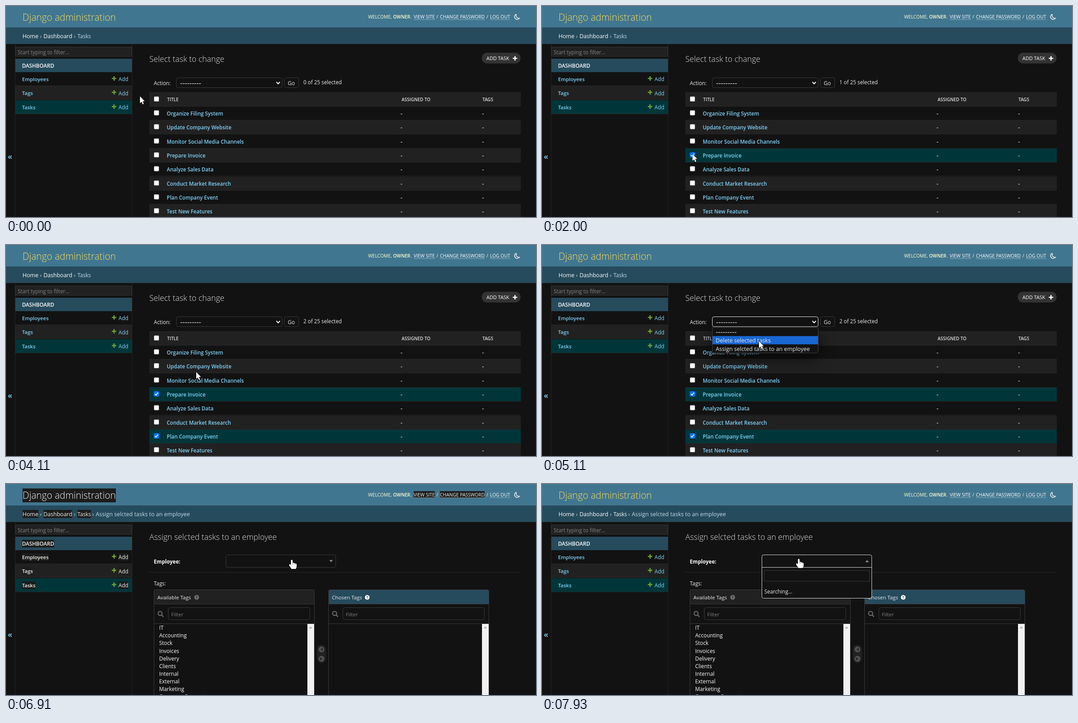
An HTML page with a canvas that plays this animation: 1187x472 px, repeating every 8000 ms.

```html
<!DOCTYPE html>
<html lang="en">
<head>
<meta charset="utf-8">
<title>Task list</title>
<style>
html, body { margin: 0; height: 100%; overflow: hidden; background: #121212; }
canvas { display: block; }
</style>
</head>
<body>
<canvas id="stage" width="1187" height="472"></canvas>
<script>
const c = document.getElementById('stage').getContext('2d');
const LOOP = 8000;
const BG = '#121212', DARK = '#212121', LINE = '#272727', EDGE = '#3a3a3a';
const BLUE = '#264b5d', LINK = '#81d4fa', TEXT = '#eeeeee', PICKED = '#00363a';
const TASKS = ['Organize Filing System', 'Update Company Website', 'Monitor Social Media Channels',
  'Prepare Invoice', 'Analyze Sales Data', 'Conduct Market Research', 'Plan Company Event', 'Test New Features'];
const TAGS = ['IT', 'Accounting', 'Stock', 'Invoices', 'Delivery', 'Clients', 'Internal', 'External',
  'Marketing', 'Customer Support'];
const ASSIGN = 'Assign selcted tasks to an employee', DASHES = '---------';

// pointer tip: time, x, y
const PATH = [[0, 300, 202], [730, 300, 202], [1000, 318, 245], [1340, 336, 309], [1470, 336, 319],
  [1600, 337, 331], [2260, 337, 331], [3000, 339, 423], [3100, 339, 425], [3700, 339, 425],
  [4430, 494, 175], [4840, 494, 175], [5110, 486, 215], [5450, 506, 225], [5590, 506, 225],
  [6120, 639, 171], [6320, 640, 170], [7050, 640, 170], [7350, 620, 172], [7800, 579, 170], [7930, 575, 168]];

function pointerAt(t) {
  const i = PATH.findIndex(p => p[0] > t);
  if (i < 0) return PATH[PATH.length - 1].slice(1);
  const [t0, x0, y0] = PATH[i - 1], [t1, x1, y1] = PATH[i], k = (t - t0) / (t1 - t0);
  return [x0 + (x1 - x0) * k, y0 + (y1 - y0) * k];
}

function rect(x, y, w, h, fill) {
  c.fillStyle = fill;
  c.fillRect(x, y, w, h);
}

function frame(x, y, w, h, r, fill, edge) {
  c.beginPath();
  c.roundRect(x + .5, y + .5, w - 1, h - 1, r);
  c.fillStyle = fill;
  c.fill();
  if (edge) stroke(edge, 1);
}

function stroke(color, width) {
  c.strokeStyle = color;
  c.lineWidth = width;
  c.stroke();
}

function lines(color, width, ...runs) {
  c.beginPath();
  for (const run of runs)
    for (let i = 0; i < run.length; i += 2) c[i ? 'lineTo' : 'moveTo'](run[i], run[i + 1]);
  stroke(color, width);
}

function disc(x, y, r, fill) {
  c.beginPath();
  c.arc(x, y, r, 0, 7);
  c.fillStyle = fill;
  c.fill();
}

// y is the middle of the capitals
function text(s, x, y, size = 11.8, color = TEXT, weight = 400) {
  c.font = `${weight} ${size}px "Open Sans", "Noto Sans", sans-serif`;
  c.fillStyle = color;
  c.fillText(s, x, Math.ceil(y + size * .36));
}

function link(s, x, y, size, color, weight, boxed) {
  if (boxed) {
    c.font = `${weight} ${size}px "Open Sans", "Noto Sans", sans-serif`;
    const h = size * 1.45;
    rect(x, Math.round(y - h / 2), c.measureText(s).width, Math.round(h), '#1c1c1c');
  }
  text(s, x, y, size, boxed ? '#f4f4ee' : color, weight);
}

function plus(x, y, r, color) {
  lines(color, 2.6, [x - r, y, x + r, y], [x, y - r, x, y + r]);
}

function chrome(page2, boxed) {
  rect(0, 0, 1187, 472, BG);
  rect(0, 0, 1187, 48, '#417690');
  rect(0, 48, 1187, 37, BLUE);
  link('Django administration', 37, 25, 21.1, '#f5dd5d', 300, boxed);

  text('WELCOME,', 811, 24, 10.4, '#ffffcc');
  text('OWNER', 867, 24, 10.4, '#ffffcc', 600);
  text('.', 906, 24, 10.4, '#ffffcc');
  [['VIEW SITE', 913, 48], ['CHANGE PASSWORD', 972, 101], ['LOG OUT', 1084, 45]].forEach(([s, x, w], i) => {
    link(s, x, 24, 10.4, '#ffffff', 400, boxed && i < 2);
    rect(x, 30, w, 1, 'rgba(255,255,255,.4)');
    if (i) text('/', x - 8, 24, 10.4, '#ffffcc');
  });
  c.beginPath();
  c.arc(1145, 24, 6, -1.9, 2.9 - 2.3, true);
  c.quadraticCurveTo(1141, 28, 1143, 18.3);
  stroke('#ffffff', 1.4);

  link('Home', 37, 67, 12.5, '#ffffff', 400, boxed);
  link('Dashboard', 84, 67, 12.5, '#ffffff', 400, boxed);
  link('Tasks', 160, 67, 12.1, page2 ? '#ffffff' : '#c4dce8', 400, boxed);
  text('›', 76, 67, 12.5, '#c4dce8');
  text('›', 152, 67, 12.5, '#c4dce8');
  if (page2) {
    text('›', 193, 67, 12.5, '#c4dce8');
    text(ASSIGN, 201, 67, 12.65, '#c4dce8');
  }

  rect(20, 85, 1, 387, LINE);
  rect(282, 85, 1, 387, LINE);
  text('«', 4, 336, 18, LINK, 600);
  frame(21, 91, 261, 22, 0, DARK, '#353535');
  text('Start typing to filter...', 26, 103, 11.85, '#858585');
  rect(21, 118, 261, 30, BLUE);
  link('DASHBOARD', 36, 133, 11.7, '#ffffff', 600, boxed);
  ['Employees', 'Tags', 'Tasks'].forEach((s, i) => {
    const y = 148 + 31.3 * i;
    rect(21, Math.round(y), 261, 31, [BG, DARK, PICKED][i]);
    rect(21, Math.round(y) + 30, 261, 1, LINE);
    link(s, 36, y + 15.5, 11.5, LINK, 600, boxed);
    link('Add', 252, y + 15.5, 11.8, LINK, 400, boxed);
    plus(242, Math.round(y) + 14, 5, '#70a630');
  });
}

function checkbox(y, on) {
  frame(331, y - 6, 12, 12, 2, on ? '#0075ff' : '#ffffff', on ? '#0075ff' : '#767676');
  if (on) lines('#ffffff', 1.9, [333.5, y + .3, 336, y + 2.8, 340.6, y - 3]);
}

function listPage(t) {
  const menu = t >= 4570 && t < 5590, assigned = t >= 5590;
  const count = (t >= 2000) + (t >= 3560);
  text('Select task to change', 321, 118, 17.8, '#e0e0e0', 300);
  frame(1065, 104, 88, 25, 12, '#333333');
  text('ADD TASK', 1076, 117, 11, '#ffffff');
  plus(1140, 117, 5, '#ffffff');

  text('Action:', 331, 172);
  frame(381, 160, 238, 23, 4, BG, t >= 4570 && t < 6320 ? '#eeeeee' : EDGE);
  text(assigned ? ASSIGN : DASHES, 390, 172, assigned ? 12.65 : 16.2);
  lines('#ffffff', 2, [605.5, 170, 609.5, 174, 613.5, 170]);
  frame(623, 160, 33, 23, 4, BG, t >= 6050 ? '#eeeeee' : EDGE);
  text('Go', 631, 172, 12);
  text(`${count} of 25 selected`, 666, 170);

  rect(321, 193, 832, 32, DARK);
  rect(321, 193, 832, 1, LINE);
  rect(321, 224, 832, 1, LINE);
  checkbox(208, false);
  text('TITLE', 361, 209, 10, '#e0e0e0', 600);
  text('ASSIGNED TO', 886, 209, 10, '#e0e0e0', 600);
  text('TAGS', 1067, 209, 10, '#e0e0e0', 600);
  TASKS.forEach((s, i) => {
    const y = Math.round(225 + 31.3 * i), mid = 240.3 + 31.35 * i;
    const lit = i == 3 && t >= 2000 || i == 6 && t >= 3560;
    rect(321, y, 832, 31, lit ? PICKED : i % 2 ? DARK : BG);
    rect(321, y + 30, 832, 1, LINE);
    checkbox(Math.round(239 + 31.35 * i), i == 3 && t >= 1800 || i == 6 && t >= 3430);
    text(s, 360, mid, 11.6, LINK, 600);
    text('-', 883.5, mid, 14);
    text('-', 1066, mid, 14);
  });

  if (menu) {
    const pick = t < 4980 ? 0 : t < 5250 ? 1 : 2;
    c.save();
    c.shadowColor = 'rgba(0,0,0,.6)';
    c.shadowBlur = 32;
    c.shadowOffsetY = 12;
    frame(381, 184, 238, 58, [0, 0, 5, 5], BG);
    c.restore();
    frame(381, 184, 238, 58, [0, 0, 5, 5], BG, '#444444');
    rect(382, 185 + 18.7 * pick, 236, 18.5, '#1967d2');
    text(DASHES, 389, 194, 16.2);
    text('Delete selected tasks', 389, 213, 12.6);
    text(ASSIGN, 389, 232, 12.65);
  }
}

function tagBox(x, title, head, chosen) {
  frame(x, 236, 360, 250, 4, BG, EDGE);
  frame(x, 236, 360, 33, [4, 4, 0, 0], head, EDGE);
  text(title, x + 8, 253, 11.6);
  const hx = x + (chosen ? 87 : 96);
  disc(hx, 253.5, 5.3, chosen ? '#ffffff' : '#707070');
  text('?', hx - 2.3, 253.5, 9, head, 700);
  c.beginPath();
  c.arc(x + 14, 289.5, 4.5, 0, 7);
  stroke('#707070', 2);
  lines('#707070', 2.4, [x + 17.5, 293, x + 21.5, 297]);
  frame(x + 32, 276, 318, 28, 4, BG, EDGE);
  text('Filter', x + 39, 291, 11.6, '#808080');
  rect(x, 312, 360, 1, EDGE);
  rect(x + 344, 313, 15, 159, '#f1f1f1');
  c.beginPath();
  c.moveTo(x + 348, 323);
  c.lineTo(x + 351.5, 319);
  c.lineTo(x + 355, 323);
  c.fillStyle = '#a3a3a3';
  c.fill();
}

function assignPage(t) {
  const open = t >= 7350;
  text(ASSIGN, 321, 118, 17.8, '#e0e0e0', 300);
  text('Employee:', 331, 173, 11.6, '#ffffff', 700);
  rect(321, 197, 832, 1, LINE);
  text('Tags:', 331, 222);
  tagBox(331, 'Available Tags', DARK, false);
  tagBox(722, 'Chosen Tags', BLUE, true);
  TAGS.forEach((s, i) => text(s, 343, 321.5 + 17.1 * i, 11.9, '#ffffff'));
  frame(696, 359, 21, 42, 10, DARK);
  [[370, 1], [391, -1]].forEach(([y, d]) => {
    disc(706.5, y, 6.5, '#555555');
    lines(DARK, 1.6, [706.5 - 4 * d, y, 706.5 + 3.5 * d, y],
      [706.5, y - 3.5, 706.5 + 3.5 * d, y, 706.5, y + 3.5]);
  });

  if (open) frame(492, 186, 247, 70, [0, 0, 4, 4], BG, '#dddddd');
  frame(492, 158, 247, 29, open ? [4, 4, 0, 0] : 4, BG, open ? '#dddddd' : EDGE);
  const d = open ? -2.5 : 2.5;
  c.beginPath();
  c.moveTo(724, 172.5 - d);
  c.lineTo(732, 172.5 - d);
  c.lineTo(728, 172.5 + d);
  c.fillStyle = '#888888';
  c.fill();
  if (open) {
    frame(497, 193, 237, 25, 0, BG, EDGE);
    text('Searching...', 498, 240, 11.7);
  }
}

function pointer(x, y, hand) {
  const shape = hand
    ? 'M-2 1.5Q-2-.5 0-.5T2 1.5V6Q4 5 5 7Q7 6 8 8Q11 7.5 11 10V14Q11 17 9 20H-1Q-2 17-5 13.5Q-7 10.5-5 9.5Q-3.5 9-2 11.5Z'
    : 'M0 0V15.5L3.6 12.2L6.2 18L8.6 17L6.1 11.3H10.8Z';
  const path = new Path2D(shape);
  c.save();
  c.translate(Math.round(x), Math.round(y));
  c.lineJoin = 'round';
  c.lineWidth = 1.4;
  c.strokeStyle = '#000000';
  c.stroke(path);
  c.fillStyle = '#ffffff';
  c.fill(path);
  if (hand) lines('#555555', .7, [2, 6, 2, 10], [5, 7, 5, 10], [8, 8, 8, 11]);
  c.restore();
}

function draw(now) {
  const t = now % LOOP, page2 = t >= 6910;
  chrome(page2, page2 && t < 7110);
  (page2 ? assignPage : listPage)(t);
  pointer(...pointerAt(t), t >= 6050);
  requestAnimationFrame(draw);
}
requestAnimationFrame(draw);
</script>
</body>
</html>
```
